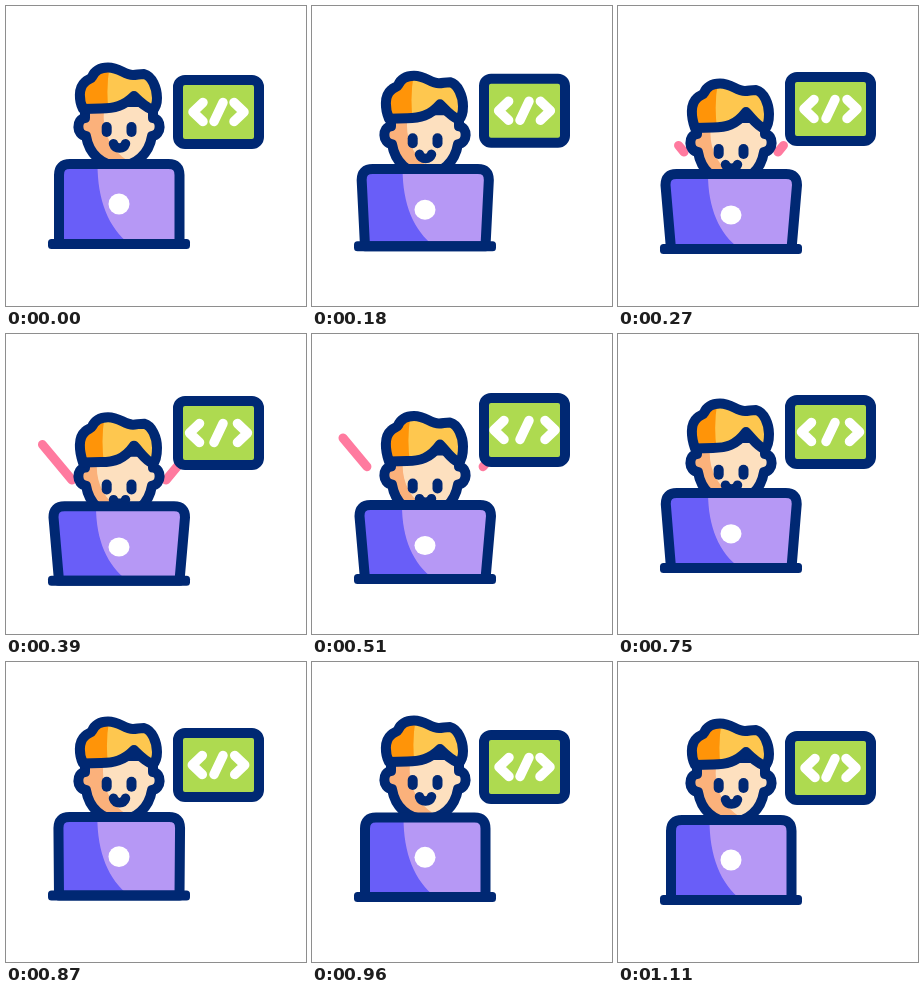
An HTML page for the animation above (1.38 s loop, 300 by 300 pixels).

```html
<!DOCTYPE html>
<html lang="en">
<head>
<meta charset="utf-8">
<title>Coder</title>
<style>
  html, body { margin: 0; width: 100%; height: 100%; overflow: hidden; background: #fff; }
  svg { display: block; width: 100%; height: 100%; stroke-linecap: round; stroke-linejoin: round; }
</style>
</head>
<body>
<svg id="stage" viewBox="0 0 300 300"></svg>
<script>
const LOOP = 1380, STEP = 30;
const NAVY = '#002873', PINK = '#ff7a9f';
const stage = document.getElementById('stage');

// Key times shared by every track, in ms
const times = [60, 270, 420, 510, 630, 750, 870, 960, 1110];
const tracks = {
  base:   [0, 5, 9, 7, 1, -4, -4.4, -3, 0],
  top:    [153, 163, 167.5, 166, 160, 154, 150, 150.6, 153],
  flare:  [0, 1, 1, 1, 1, .95, .1, 0, 0],
  head:   [0, 16, 22, 20.5, 14, 8, -2, -3, 0],
  look:   [0, .75, 1, 1, 1, .85, .1, 0, 0],
  sign:   [0, -3, -8, -10, -10, -8, -3, -1, 0],
  spread: [0, 1, 4, 5, 5, 3.5, .7, 0, 0]
};

const clamp = x => Math.min(1, Math.max(0, x));
const smooth = (t, a, b) => { const u = clamp((t - a) / (b - a)); return u * u * (3 - 2 * u); };
const mix = (a, b, u) => a + (b - a) * u;

// Monotone cubic through the key values: flat at extremes, never overshooting
function sample(v, t) {
  const last = times.length - 1;
  if (t <= times[0]) return v[0];
  if (t >= times[last]) return v[last];
  const slope = i => (v[i + 1] - v[i]) / (times[i + 1] - times[i]);
  const tangent = i => {
    if (i === 0 || i === last) return 0;
    const a = slope(i - 1), b = slope(i);
    return a * b > 0 ? 2 * a * b / (a + b) : 0;
  };
  const i = times.findIndex(x => x > t) - 1;
  const h = times[i + 1] - times[i], u = (t - times[i]) / h;
  return mix(v[i], v[i + 1], u * u * (3 - 2 * u))
    + h * u * (1 - u) * ((1 - u) * tangent(i) - u * tangent(i + 1));
}

const path = (d, fill, stroke = 'none', width = 10) =>
  `<path d="${d}" fill="${fill}" stroke="${stroke}" stroke-width="${width}"/>`;
const line = (d, color, width) => path(d, 'none', color, width);
const move = (x, y, body) => `<g transform="translate(${x} ${y})">${body}</g>`;

// A filled, outlined shape with a second tone clipped inside it
const toned = (id, d, light, dark, shade) =>
  `<clipPath id="${id}"><path d="${d}"/></clipPath>` + path(d, light) +
  `<g clip-path="url(#${id})">${path(shade, dark)}</g>` + line(d, NAVY, 10);

function sparks(t) {
  const tip = smooth(t, 210, 450), tail = smooth(t, 420, 660);
  if (tip <= 0 || tail >= 1) return '';
  const at = u => `${mix(66, 31, u)} ${mix(146, 104, u)}`;
  const ray = line(`M${at(tail)}L${at(tip)}`, PINK, 9);
  return ray + `<g transform="matrix(-1 0 0 1 226 0)">${ray}</g>`;
}

function sign({ sign, spread }) {
  const mark = d => line(d, '#fff', 9.5);
  return move(0, sign,
    `<rect x="172" y="74" width="81" height="64" rx="7" fill="#aeda50" stroke="${NAVY}" stroke-width="10"/>` +
    move(-spread, 0, mark('M197 96.5L187 106L197 115.5')) +
    mark('M217 96.5L208 115.5') +
    move(spread, 0, mark('M228 96.5L238 106L228 115.5')));
}

function head({ head, look }) {
  const skull = 'M79 96V112C70 113 70 129 80 130C83 148 96 160 113 160' +
    'S143 148 146 130C156 129 156 113 147 112V96Z';
  const low = 4 * look;
  const hair = `M77 ${103 + low}C73 95 72 82 79 76C82 73 85 73 86 71` +
    'C89 64 95 61.5 102 61.5C114 61.5 118 69 127 69C131 69 133 68 138 68' +
    `C146 70 151 82 151 92C151 98 150 ${101 + low} 147 ${104 + low}` +
    `C139 ${101 + low} 134 96 128 90C118 ${100 + low} 108 ${102.5 + low} 95 ${102.5 + low}Z`;
  const part = mix(102, 97, look);
  const edge = -7 * look;
  const eye = x => line(`M${x} 121V126`, NAVY, 10);
  const smile = mix(143.5, 141, look);
  const mouthY = 137.7 - 1.5 * look;
  const face = eye(100.7) + eye(125.5) +
    line(`M107.5 ${mouthY}C109.5 ${smile} 117.5 ${smile} 119.5 ${mouthY}`, NAVY, 9.5);
  return move(0, head,
    toned('skin', skull, '#fde0bf', '#fbb17b',
      `M60 90H${98 + edge}V106C${96 + edge} 125 ${104 + edge} 143 ${122 + edge} 155V170H60Z`) +
    move(0, 8 * look, face) +
    toned('hair', hair, '#fec74f', '#ff9408',
      `M60 50H${part + 4}Q${part - 4} 80 ${part + 2} 115H60Z`));
}

function laptop({ base, top, flare }) {
  const bottom = 238 + base, y = top + 5, bend = 11;
  const l = 53 - 5.5 * flare, r = 226.5 - l;
  const screen = `M53 ${bottom}L${l} ${y + bend}Q${l} ${y} ${l + bend} ${y}` +
    `H${r - bend}Q${r} ${y} ${r} ${y + bend}L173.5 ${bottom}Z`;
  const x = 91.5 - 1.5 * flare, h = bottom - y;
  const shade = `M30 ${y}H${x}C${x} ${y + h * .45} ${x + 11} ${y + h * .8} ${x + 32} ${bottom}H30Z`;
  const cy = (top + bottom + 5) / 2 + 3.5 * flare;
  return toned('screen', screen, '#b698f5', '#695ef8', shade) +
    `<rect x="42" y="${bottom - 5}" width="142" height="10" rx="3.5" fill="${NAVY}"/>` +
    `<ellipse cx="113" cy="${cy}" rx="10.5" ry="${10.5 - flare}" fill="#fff"/>`;
}

function draw() {
  const t = Math.floor(performance.now() % LOOP / STEP) * STEP;
  const pose = {};
  for (const name in tracks) pose[name] = sample(tracks[name], t);
  stage.innerHTML = sparks(t) + sign(pose) + head(pose) + laptop(pose);
  requestAnimationFrame(draw);
}
draw();
</script>
</body>
</html>
```
